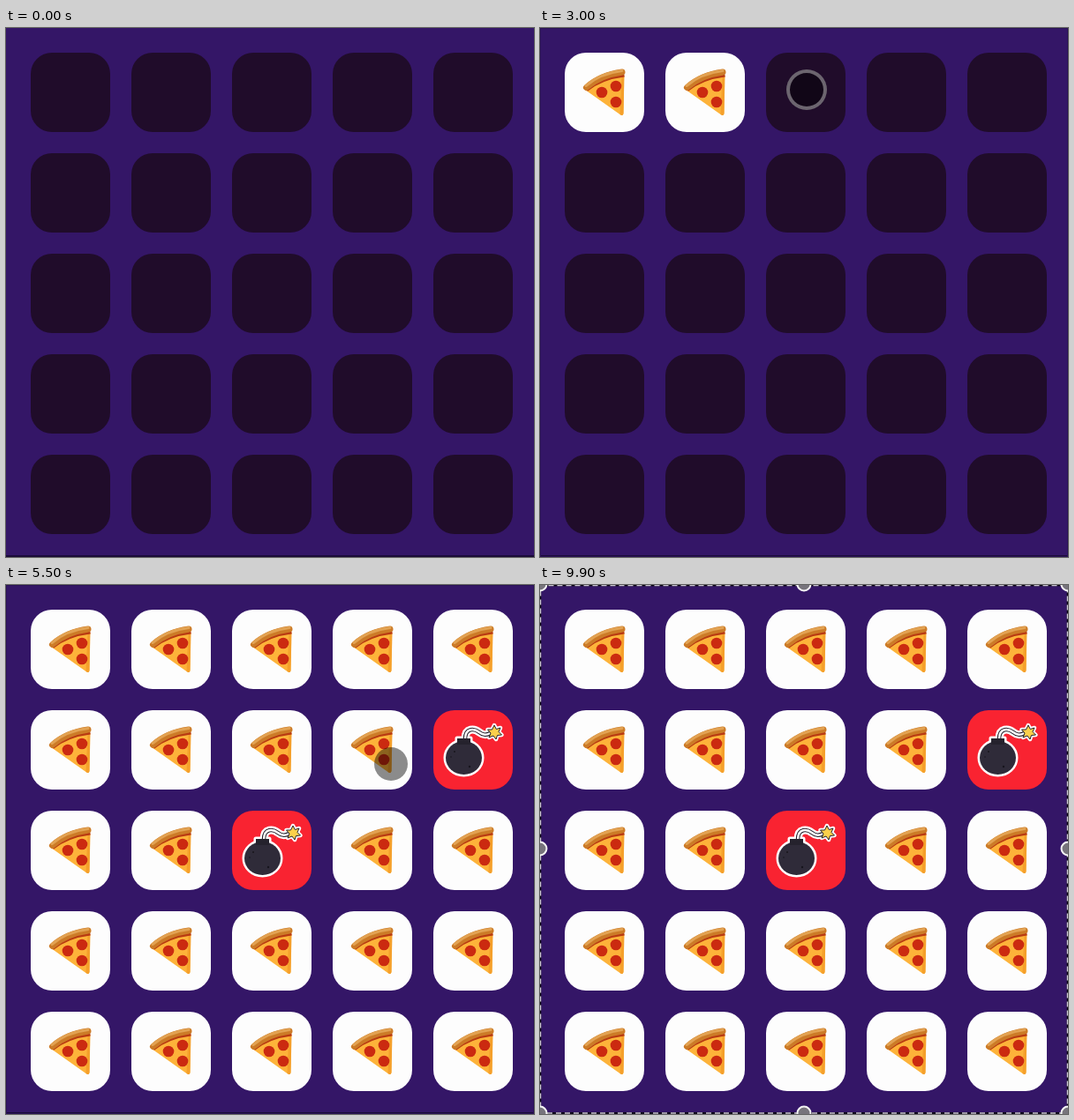
Write an HTML page without scripts that moves like this. It is 598 by 600 pixels and loops after 10 s.

```html
<!DOCTYPE html>
<html lang="en">
<head>
<meta charset="utf-8">
<title>Pizza board</title>
<style>
html, body { margin: 0; width: 100%; height: 100%; overflow: hidden; background: #341667; }
.stage { position: relative; width: 598px; height: 600px; overflow: hidden; }
.edge { position: absolute; inset: 0; border-bottom: 2px solid #1a0b38; }
.rim { position: absolute; inset: 0; box-shadow: inset 0 0 0 1px #2a1256; animation: rim 10s step-end infinite; }
.board { position: absolute; left: 28px; top: 28px; display: grid; grid-template-columns: repeat(5, 90px); gap: 24px; }
.tile { position: relative; height: 90px; transform-style: preserve-3d; animation: all 10s ease infinite; }
.tile > * { position: absolute; left: 0; top: 0; width: 90px; height: 90px; border-radius: 24px; backface-visibility: hidden; }
.tile b { background: #200c2a; }
.tile svg { background: #fdfdfd; transform: rotateY(180deg); }
.tile .bomb { background: #f92331; }
.tile:nth-child(1) { animation-name: one; }
.tile:nth-child(2) { animation-name: two; }
.tile:nth-child(3) { animation-name: three; }
.tile:nth-child(4) { animation-name: four; }
.tile:nth-child(5) { animation-name: five; }

@keyframes one { 0%, 16% { transform: rotateY(0) } 21%, 100% { transform: rotateY(180deg) } }
@keyframes two { 0%, 24.5% { transform: rotateY(0) } 29.5%, 100% { transform: rotateY(180deg) } }
@keyframes three { 0%, 30% { transform: rotateY(0) } 35%, 100% { transform: rotateY(180deg) } }
@keyframes four { 0%, 34.97% { transform: rotateY(0) } 39.97%, 100% { transform: rotateY(180deg) } }
@keyframes five { 0%, 39% { transform: rotateY(0) } 44%, 100% { transform: rotateY(180deg) } }
@keyframes all { 0%, 47.65% { transform: rotateY(0) } 52.65%, 100% { transform: rotateY(180deg) } }
@keyframes rim { 0% { opacity: 0 } 4%, 100% { opacity: 1 } }

.pointer { position: absolute; left: 0; top: 0; animation: move 10s ease-in-out infinite; }
.pointer > * { position: absolute; opacity: 0; animation: 10s step-end infinite; }
.dot, .ring { border-radius: 50%; background: rgba(0, 0, 0, .45); }
.dot { left: -19px; top: -19px; width: 38px; height: 38px; animation-name: dot !important; }
.ring { left: -23px; top: -23px; width: 38px; height: 38px; border: 4px solid rgba(255, 255, 255, .38); animation-name: ring !important; }
.arrow { left: 0; top: 0; overflow: visible; animation-name: arrow !important; }

@keyframes move {
  0%, 4% { transform: translate(240px, 640px) }
  12%, 16.5% { transform: translate(75px, 74px) }
  21%, 22.3% { transform: translate(285px, 72px) }
  23.7%, 25.5% { transform: translate(190px, 70px) }
  28.5%, 31% { transform: translate(302px, 70px) }
  33%, 35% { transform: translate(416px, 68px) }
  37.5%, 40.5% { transform: translate(529px, 66px) }
  46% { transform: translate(438px, 205px) }
  48%, 50% { transform: translate(436px, 198px) }
  54%, 80% { transform: translate(436px, 203px) }
  81.5%, 100% { transform: translate(450px, 640px) }
}
@keyframes arrow { 0% { opacity: 1 } 14.5% { opacity: 0 } 17% { opacity: 1 } 23.5%, 100% { opacity: 0 } }
@keyframes ring {
  0% { opacity: 0 } 14.5% { opacity: 1 } 17% { opacity: 0 }
  23.5% { opacity: 1 } 25.5% { opacity: 0 }
  29% { opacity: 1 } 31% { opacity: 0 }
  33.5% { opacity: 1 } 35.5% { opacity: 0 }
  37.7% { opacity: 1 } 40% { opacity: 0 }
  46.8% { opacity: 1 } 50.5%, 100% { opacity: 0 }
}
@keyframes dot {
  0% { opacity: 0 }
  25.5% { opacity: 1 } 29% { opacity: 0 }
  31% { opacity: 1 } 33.5% { opacity: 0 }
  35.5% { opacity: 1 } 37.7% { opacity: 0 }
  40% { opacity: 1 } 46.8% { opacity: 0 }
  50.5% { opacity: 1 } 82%, 100% { opacity: 0 }
}

.select { position: absolute; left: 0; top: 0; animation: select 10s step-end infinite; }
.select rect { fill: none; stroke: #0a0612; stroke-width: 1.6; }
.select .ants { stroke: #c9c5d0; stroke-dasharray: 6 4; animation: ants 1s steps(10) infinite; }
.select circle { fill: #77747c; stroke: #f4f4f4; stroke-width: 2; }
@keyframes select { 0% { opacity: 0 } 88%, 100% { opacity: 1 } }
@keyframes ants { to { stroke-dashoffset: -10 } }
</style>
</head>
<body>
<svg width="0" height="0" style="position:absolute">
  <defs>
    <g id="pizza">
      <path d="M23 42 Q42 25 67 23 L66.500 69 Q66 72.500 62.500 70 Z" fill="#fdb33a"/>
      <path d="M64.500 26 L67.500 26 L66.500 69 Q66 72.500 62.500 70 Z" fill="#f5a02b"/>
      <path d="M25 42.500 Q42 29 67.500 26" fill="none" stroke="#b93a12" stroke-width="3"/>
      <path d="M24.500 39.500 Q40 25.500 65 22" fill="none" stroke="#cc7b27" stroke-width="7" stroke-linecap="round"/>
      <path d="M24 37.500 Q40 23.500 65 20.500" fill="none" stroke="#e2a252" stroke-width="3" stroke-linecap="round"/>
      <g fill="#cb2a10">
        <circle cx="42" cy="45" r="6.300"/>
        <circle cx="58" cy="38" r="6.300"/>
        <circle cx="58" cy="56" r="6.300"/>
      </g>
    </g>
    <g id="bomb" stroke-linejoin="round">
      <g fill="#fff" stroke="#fff" stroke-width="5">
        <ellipse cx="34.500" cy="54" rx="20.500" ry="19"/>
        <path d="M27 32 H42 V38 H27 Z"/>
        <path d="M36 33 C36 19 47 21 52 25 S60 28 65 26" fill="none" stroke-width="9"/>
        <use href="#spark" stroke-width="4.500"/>
      </g>
      <path d="M36 33 C36 19 47 21 52 25 S60 28 65 26" fill="none" stroke="#25222d" stroke-width="4.600"/>
      <path d="M36 33 C36 19 47 21 52 25 S60 28 65 26" fill="none" stroke="#fff" stroke-width="2.400"/>
      <ellipse cx="34.500" cy="54" rx="20.500" ry="19" fill="#2f2b39"/>
      <path d="M27 32 H42 V39 H27 Z" fill="#25222d"/>
      <g fill="#17151d"><circle cx="24" cy="47" r="1"/><circle cx="41" cy="64" r="1.200"/><circle cx="20" cy="53" r=".8"/></g>
      <use href="#spark" fill="#fbd04b" stroke="#25222d" stroke-width="1"/>
    </g>
    <path id="spark" d="M69 17 L71.300 21.500 L76 20 L74 24.500 L77.500 28 L72.500 28.500 L71 33 L68 29 L63 31 L65 26 L61.500 22 L66.500 22 Z"/>
  </defs>
</svg>
<div class="stage">
  <div class="edge"></div>
  <div class="rim"></div>
  <div class="board">
    <div class="tile"><b></b><svg><use href="#pizza"/></svg></div>
    <div class="tile"><b></b><svg><use href="#pizza"/></svg></div>
    <div class="tile"><b></b><svg><use href="#pizza"/></svg></div>
    <div class="tile"><b></b><svg><use href="#pizza"/></svg></div>
    <div class="tile"><b></b><svg><use href="#pizza"/></svg></div>

    <div class="tile"><b></b><svg><use href="#pizza"/></svg></div>
    <div class="tile"><b></b><svg><use href="#pizza"/></svg></div>
    <div class="tile"><b></b><svg><use href="#pizza"/></svg></div>
    <div class="tile"><b></b><svg><use href="#pizza"/></svg></div>
    <div class="tile"><b></b><svg class="bomb"><use href="#bomb"/></svg></div>

    <div class="tile"><b></b><svg><use href="#pizza"/></svg></div>
    <div class="tile"><b></b><svg><use href="#pizza"/></svg></div>
    <div class="tile"><b></b><svg class="bomb"><use href="#bomb"/></svg></div>
    <div class="tile"><b></b><svg><use href="#pizza"/></svg></div>
    <div class="tile"><b></b><svg><use href="#pizza"/></svg></div>

    <div class="tile"><b></b><svg><use href="#pizza"/></svg></div>
    <div class="tile"><b></b><svg><use href="#pizza"/></svg></div>
    <div class="tile"><b></b><svg><use href="#pizza"/></svg></div>
    <div class="tile"><b></b><svg><use href="#pizza"/></svg></div>
    <div class="tile"><b></b><svg><use href="#pizza"/></svg></div>

    <div class="tile"><b></b><svg><use href="#pizza"/></svg></div>
    <div class="tile"><b></b><svg><use href="#pizza"/></svg></div>
    <div class="tile"><b></b><svg><use href="#pizza"/></svg></div>
    <div class="tile"><b></b><svg><use href="#pizza"/></svg></div>
    <div class="tile"><b></b><svg><use href="#pizza"/></svg></div>
  </div>
  <div class="pointer">
    <div class="dot"></div>
    <div class="ring"></div>
    <svg class="arrow" width="24" height="38"><path d="M0 0 V28.500 L6.500 22.500 L11 33.500 L16.500 31 L12 20.500 H20 Z" fill="#000" stroke="#fff" stroke-width="2"/></svg>
  </div>
  <svg class="select" width="598" height="600">
    <rect x=".5" y=".5" width="597" height="598.500"/>
    <rect class="ants" x=".5" y=".5" width="597" height="598.500"/>
    <circle cx="0" cy="-1" r="7.500"/><circle cx="299" cy="-1" r="7.500"/><circle cx="598" cy="-1" r="7.500"/>
    <circle cx="0" cy="299" r="7.500"/><circle cx="598" cy="299" r="7.500"/>
    <circle cx="0" cy="599" r="7.500"/><circle cx="299" cy="599" r="7.500"/><circle cx="598" cy="599" r="7.500"/>
  </svg>
</div>
</body>
</html>
```
